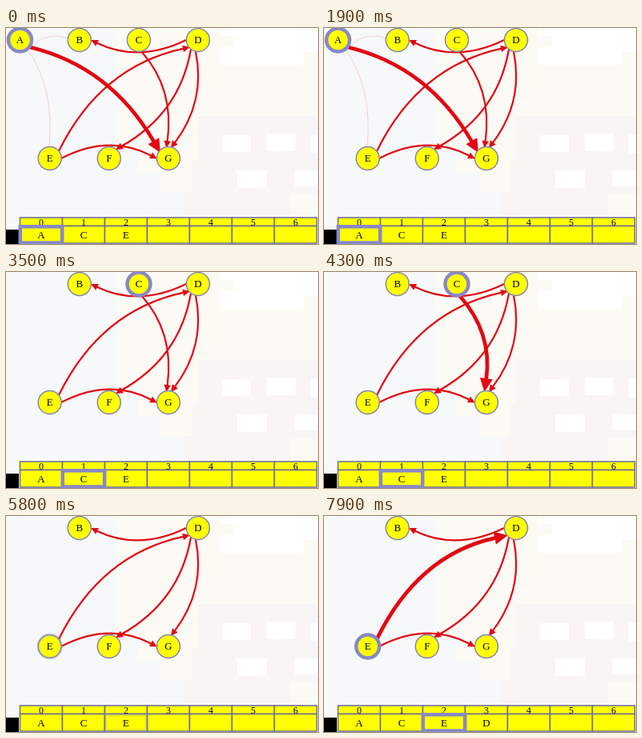
Recreate the animation shown at these times as an HTML page. Size 390 by 270 pixels, loop 8000 ms.

```html
<!DOCTYPE html>
<html lang="en">
<head>
<meta charset="utf-8">
<style>
  html, body { margin: 0; width: 100%; height: 100%; overflow: hidden; background: #f6f8f9; }
  svg { display: block; width: 390px; height: 270px; }
  text { font-family: "Liberation Serif", Times, serif; font-size: 13px; text-anchor: middle; }
  .head { font-size: 12px; }
  .ring { fill: none; stroke: #8888c8; stroke-width: 4.5; }
</style>
</head>
<body>
<svg id="stage" viewBox="0 0 390 270">
  <rect width="390" height="270" fill="#f6f8f9"/>
  <path d="M139 0H390V270H222V205H194V180H165V150H139Z" fill="#fbfaf5"/>
  <path d="M240 110H390V207H355V237H222V205H233V165H240Z" fill="#f9f5f4"/>
  <path d="M268 0H390V30H372V46H268V24H285V10H268Z
           M270 134H306V155H270Z M326 132H362V154H326Z M381 133H390V157H381Z
           M289 178H326V200H289Z M361 178H390V198H361Z" fill="#fff"/>
  <rect y="252" width="16" height="18"/>
</svg>
<script>
const LOOP = 8000;
const RED = '#e20812';
const stage = document.getElementById('stage');

const nodes = {
  A: [17.5, 15], B: [91.8, 15], C: [166, 15], D: [240, 15],
  E: [54.7, 163], F: [128.8, 163], G: [203, 163]
};
// start, control point, arrow tip
const edges = {
  AG: [30, 24, 130, 48, 193, 156],
  DB: [225, 15, 166, 44, 106, 15],
  CG: [169, 29, 211, 76, 200.5, 150],
  DF: [231, 27, 217, 107, 137, 152],
  DG: [237, 29, 250, 92, 206, 150],
  ED: [66, 154, 118, 48, 230, 24],
  EG: [69, 163, 129, 132, 189, 163.5]
};
// part: [start ms, end ms, from, to], ...
const tracks = {
  showA: [[2000, 2350, 1, 0]],
  showC: [[4600, 4900, 1, 0]],
  ringA: [[2000, 2350, 1, 0]],
  ringC: [[3000, 3300, 0, 1], [4600, 4900, 1, 0]],
  ringE: [[5750, 6000, 0, 1]],
  boldAG: [[0, 1, 1, 1]],
  boldCG: [[3900, 4150, 0, 1]],
  boldED: [[6250, 6500, 0, 1]],
  itemD: [[7200, 7500, 0, 1]]
};

function add(tag, attrs, parent = stage, label) {
  const el = document.createElementNS('http://www.w3.org/2000/svg', tag);
  for (const key in attrs) el.setAttribute(key, attrs[key]);
  if (label !== undefined) el.textContent = label;
  parent.append(el);
  return el;
}

function valueAt(name, t, fallback) {
  const track = tracks[name];
  if (!track) return fallback;
  let value = track[0][2];
  for (const [start, end, from, to] of track) {
    if (t < start) break;
    value = from + (to - from) * Math.min(1, (t - start) / (end - start));
  }
  return value;
}

const faint = add('path', {
  d: 'M34 22Q52 4 78 13M27 27Q61 75 54 149',
  fill: 'none', stroke: '#f2b4b8', 'stroke-width': .8
});

const edgeParts = Object.entries(edges).map(([name, points]) => {
  const group = add('g', {});
  return {
    name, points, group,
    line: add('path', { fill: 'none', stroke: RED }, group),
    head: add('path', { fill: RED }, group)
  };
});

const nodeParts = Object.entries(nodes).map(([name, [x, y]]) => {
  const group = add('g', {});
  add('circle', { cx: x, cy: y, r: 14.5, fill: '#ff0', stroke: '#8484b4', 'stroke-width': 1.5 }, group);
  const ring = add('circle', { cx: x, cy: y, r: 14.5, class: 'ring' }, group);
  add('text', { x, y: y + 4 }, group, name);
  return { name, group, ring };
});

const cellX = i => 17.5 + 53 * i;
for (let i = 0; i < 7; i++) {
  const cell = { x: cellX(i), width: 53, fill: '#ff0', stroke: '#6a6a9c', 'stroke-width': 1.5 };
  add('rect', { ...cell, y: 237, height: 10.5 });
  add('rect', { ...cell, y: 247.5, height: 21.5 });
  add('text', { x: cellX(i) + 26.5, y: 246.5, class: 'head' }, stage, i);
}
const cellRings = [...'ACE'].map((name, i) => ({
  name,
  ring: add('rect', { x: cellX(i) + .3, y: 248.3, width: 52.4, height: 20.2, class: 'ring' })
}));
const items = [...'ACED'].map((name, i) =>
  add('text', { x: cellX(i) + 26.5, y: 262.5 }, stage, name));

function drawEdge({ line, head, points }, bold) {
  const [x0, y0, cx, cy, x, y] = points;
  const width = 2.2 + 2.5 * bold;
  const length = 9 + 8 * bold, half = 4.3 + 3.7 * bold;
  const dist = Math.hypot(x - cx, y - cy);
  const ux = (x - cx) / dist, uy = (y - cy) / dist;
  const bx = x - ux * length, by = y - uy * length;
  line.setAttribute('d', `M${x0} ${y0}Q${cx} ${cy} ${bx + ux} ${by + uy}`);
  line.setAttribute('stroke-width', width);
  head.setAttribute('d',
    `M${x} ${y}L${bx - uy * half} ${by + ux * half}L${bx + uy * half} ${by - ux * half}Z`);
}

function render(now) {
  const t = now % LOOP;
  for (const edge of edgeParts) {
    drawEdge(edge, valueAt('bold' + edge.name, t, 0));
    edge.group.style.opacity = valueAt('show' + edge.name[0], t, 1);
  }
  for (const { name, group, ring } of nodeParts) {
    group.style.opacity = valueAt('show' + name, t, 1);
    ring.style.opacity = valueAt('ring' + name, t, 0);
  }
  for (const { name, ring } of cellRings) ring.style.opacity = valueAt('ring' + name, t, 0);
  items[3].style.opacity = valueAt('itemD', t, 1);
  faint.style.opacity = .75 * valueAt('showA', t, 1);
  requestAnimationFrame(render);
}
render(performance.now());
</script>
</body>
</html>
```
